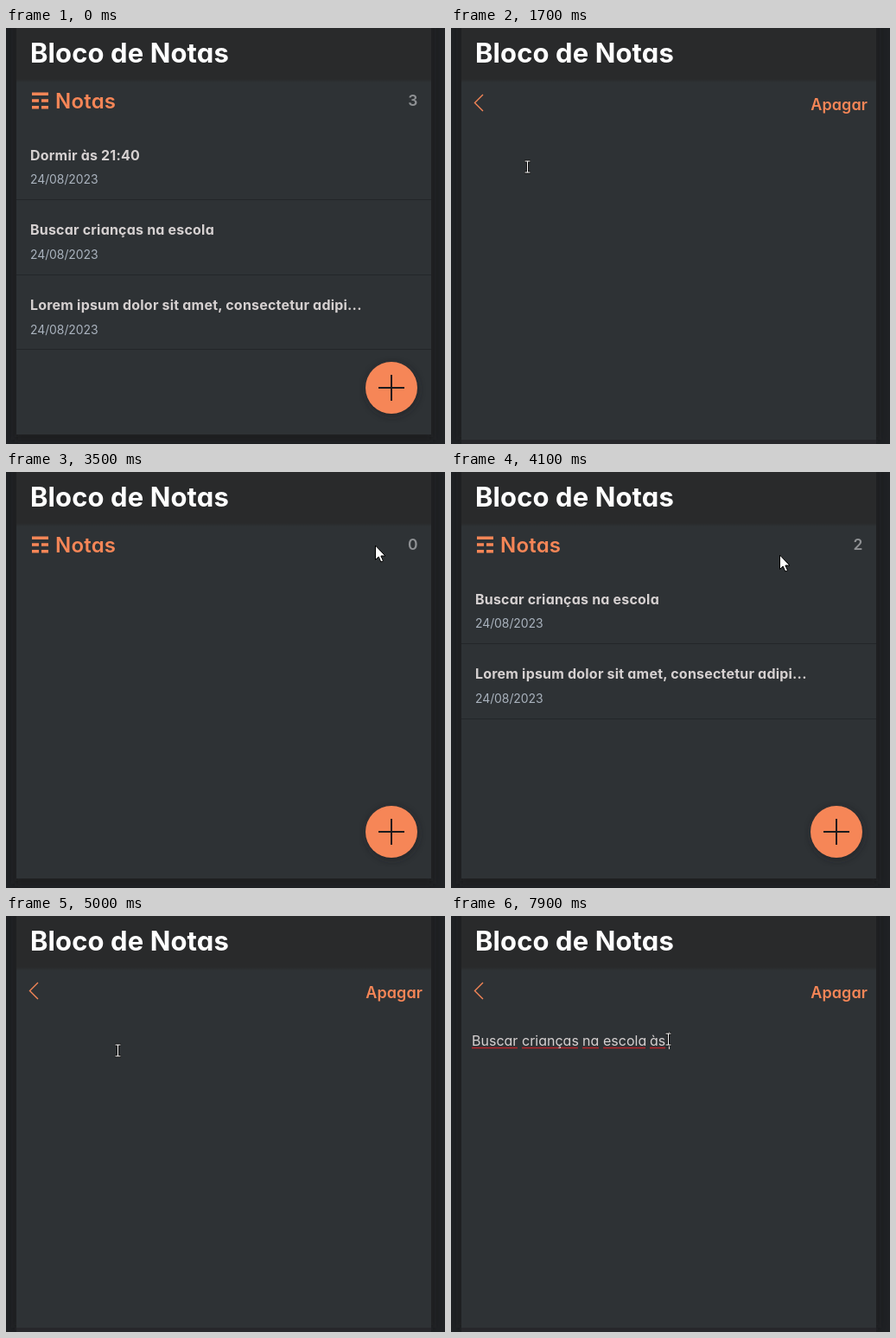
These frames come from a looping animation (508 px wide and 481 px high, 8 s). An HTML page:

```html
<!DOCTYPE html>
<html lang="pt">
<head>
<meta charset="utf-8">
<style>
  html, body { margin: 0; width: 100%; height: 100%; overflow: hidden; background: #1f2124; }
  svg { display: block; width: 508px; height: 481px; }
  text { font-family: Inter, "Open Sans", sans-serif; font-feature-settings: "cv11"; white-space: pre; }
  .heading { font-size: 31px; font-weight: 700; fill: #fff; letter-spacing: .1px; }
  .section { font-size: 24px; font-weight: 600; letter-spacing: .2px; }
  .count { font-size: 17.500px; font-weight: 600; fill: #8f9194; }
  .delete { font-size: 18px; font-weight: 600; letter-spacing: .1px; }
  .title { font-size: 16px; font-weight: 700; fill: #d6d1d1; letter-spacing: .2px; }
  .date { font-size: 14px; fill: #a9b2bd; letter-spacing: -.1px; }
  .body { font-size: 16px; fill: #d6d1d1; }
  .accent { fill: #f68657; }
</style>
</head>
<body>
<svg viewBox="0 0 508 481">
  <defs>
    <filter id="soft" x="-30%" y="-30%" width="160%" height="160%"><feGaussianBlur stdDeviation="4"/></filter>
    <linearGradient id="fade" x2="0" y2="1">
      <stop stop-color="#292a2b"/><stop offset="1" stop-color="#2e3235"/>
    </linearGradient>
  </defs>
  <rect x="10" y="-10" width="484" height="486" fill="#1b1c1f" opacity=".6" filter="url(#soft)"/>
  <rect id="panel" x="12" width="480" height="470" fill="#2e3235"/>
  <rect id="footer" x="12" y="476" width="480" height="5" fill="#27272b"/>
  <rect x="12" width="480" height="59" fill="#292a2b"/>
  <rect x="12" y="59" width="480" height="4" fill="url(#fade)"/>
  <text class="heading" x="28" y="40">Bloco de Notas</text>

  <g id="list">
    <path class="accent" d="M30 74.500h19v3.500h-19z M30 82.200h8v3.500h-8z M41 82.200h8v3.500h-8z M30 90h8v3.500h-8z M41 90h8v3.500h-8z"/>
    <text class="section accent" x="57" y="93">Notas</text>
    <text class="count" id="count" x="476.500" y="90" text-anchor="end"></text>
    <g id="rows"></g>
    <circle cx="447" cy="418" r="30" fill="#1c1e20" opacity=".6" filter="url(#soft)"/>
    <circle class="accent" cx="446" cy="416" r="30"/>
    <path d="M431 416h30M446 401v30" stroke="#1b1b1d" stroke-width="2"/>
  </g>

  <g id="editor">
    <path d="M37 77l-9.500 9.500l9.500 9.500" fill="none" stroke="#f68657" stroke-width="1.400"/>
    <text class="delete accent" x="482" y="95" text-anchor="end">Apagar</text>
    <g id="note"></g>
    <rect id="caret" y="134" width="1" height="20" fill="#e6d9d3"/>
  </g>

  <g id="arrow" fill="#fff" stroke="#000" stroke-linejoin="round">
    <path d="M.5 0v16.500l3.700-3.500l2.600 6l2.700-1.200l-2.600-5.800h5z"/>
  </g>
  <g id="hand" stroke="#000" stroke-linejoin="round">
    <path fill="#fff" d="M-3-2q1.500-2 3 0v5q1.700-1 3 .5q1.700-1 3 .7q2.600-.6 3 1.300v4l-1.500 4h-9l-4.200-6q-.8-2 1-1.800l1.700 1.300z"/>
    <path d="M1 9v2.500M3.700 9v2.500M6.400 9v2.500" stroke-width=".8"/>
  </g>
  <g id="beam" fill="none">
    <path d="M-3.500-6.500h7M0-6.500v13M-3.500 6.500h7" stroke="#111" stroke-width="3"/>
    <path d="M-3-6.500h6M0-6.500v13M-3 6.500h6" stroke="#fff"/>
  </g>
</svg>
<script>
const LOOP = 8000, STEP = 100, ROW = 86.6;
const el = id => document.getElementById(id);
const show = (id, on) => el(id).style.display = on ? '' : 'none';

const SLEEP = 'Dormir às 21:40';
const SCHOOL = 'Buscar crianças na escola';
const LOREM = 'Lorem ipsum dolor sit amet, consectetur adipi...';

// Screen changes: time, screen, contents
const scenes = [
  [0, 'list', [SLEEP, SCHOOL, LOREM]],
  [1700, 'editor', []],
  [1800, 'editor', [[24, 0, SLEEP]]],
  [3500, 'list', []],
  [3600, 'list', [SCHOOL, LOREM]],
  [5000, 'editor', []],
  [5100, 'editor', [[24, 53, 'Buscar'], [82, 65, 'crianças'], [152, 19, 'na'], [176, 49, 'escola']]],
];
// Pointer path: time, x, y
const path = [
  [700, 2, 133], [1000, 88, 160], [2200, 88, 160], [2400, 295, 119],
  [2600, 295, 119], [2900, 434, 92], [3000, 427, 85], [3900, 427, 85],
  [4700, 129, 155], [5300, 129, 155], [5900, 251, 142], [8000, 251, 142],
];
// Caret: time, x (0 = hidden)
const carets = [[0, 0], [6000, 225], [6500, 0], [6900, 229], [7400, 0], [7600, 239], [7800, 248], [7900, 252]];

const latest = (keys, t) => keys.filter(k => k[0] <= t).pop();

function pointerAt(t) {
  const i = path.findIndex(k => k[0] > t);
  const [t0, x0, y0] = path[i - 1], [t1, x1, y1] = path[i];
  const p = (t - t0) / (t1 - t0), e = p * p * (3 - 2 * p);
  return [Math.round(x0 + (x1 - x0) * e), Math.round(y0 + (y1 - y0) * e)];
}

function row(title, i, hovered) {
  const y = offset => Math.round(offset + i * ROW);
  return `${hovered ? `<rect x="12" y="${y(125)}" width="480" height="73" fill="#1f2124"/>` : ''}
    <text class="title" x="28" y="${y(152.6)}">${title}</text>
    <text class="date" x="28" y="${y(180.4)}">24/08/2023</text>
    <rect x="12" y="${y(198)}" width="480" height="1" fill="#232629"/>`;
}

function word([x, width, text], marked) {
  const line = marked ? `<path d="M${x} 152.500h${width}" stroke="#b5242a" stroke-width="1.500"/>` : '';
  return line + `<text class="body" x="${x}" y="150">${text}</text>`;
}

let drawn = -1;
function draw(t) {
  if (t === drawn) return;
  drawn = t;
  const [, screen, items] = latest(scenes, t);
  const isList = screen === 'list';
  const visible = t >= path[0][0];
  const [x, y] = visible ? pointerAt(t) : [-99, -99];
  const hovered = isList && x >= 12 && y >= 125 ? Math.floor((y - 125) / ROW) : -1;

  show('list', isList);
  show('editor', !isList);
  show('footer', !isList);
  el('panel').setAttribute('height', isList ? 470 : 476);

  if (isList) {
    el('count').textContent = items.length;
    el('rows').innerHTML = items.map((title, i) => row(title, i, i === hovered)).join('');
  } else {
    const typed = t >= 7800 ? 'às' : t >= 7600 ? 'à' : '';
    el('note').innerHTML = items.map(w => word(w, t >= 6000)).join('')
      + (typed ? word([230, 18, typed], t >= 7900) : '');
    const caretX = latest(carets, t)[1];
    show('caret', caretX > 0);
    el('caret').setAttribute('x', caretX);
  }

  const onDelete = !isList && x > 414 && y < 100;
  const kind = hovered >= 0 && hovered < items.length || onDelete ? 'hand'
    : !isList && y > 111 ? 'beam' : 'arrow';
  for (const id of ['arrow', 'hand', 'beam']) show(id, visible && id === kind);
  const offset = kind === 'beam' ? .5 : 0;
  el(kind).setAttribute('transform', `translate(${x + offset} ${y + offset})`);
}

const start = performance.now();
function frame() {
  const t = (performance.now() - start) % LOOP;
  draw(Math.floor(t / STEP) * STEP);
  requestAnimationFrame(frame);
}
frame();
</script>
</body>
</html>
```
